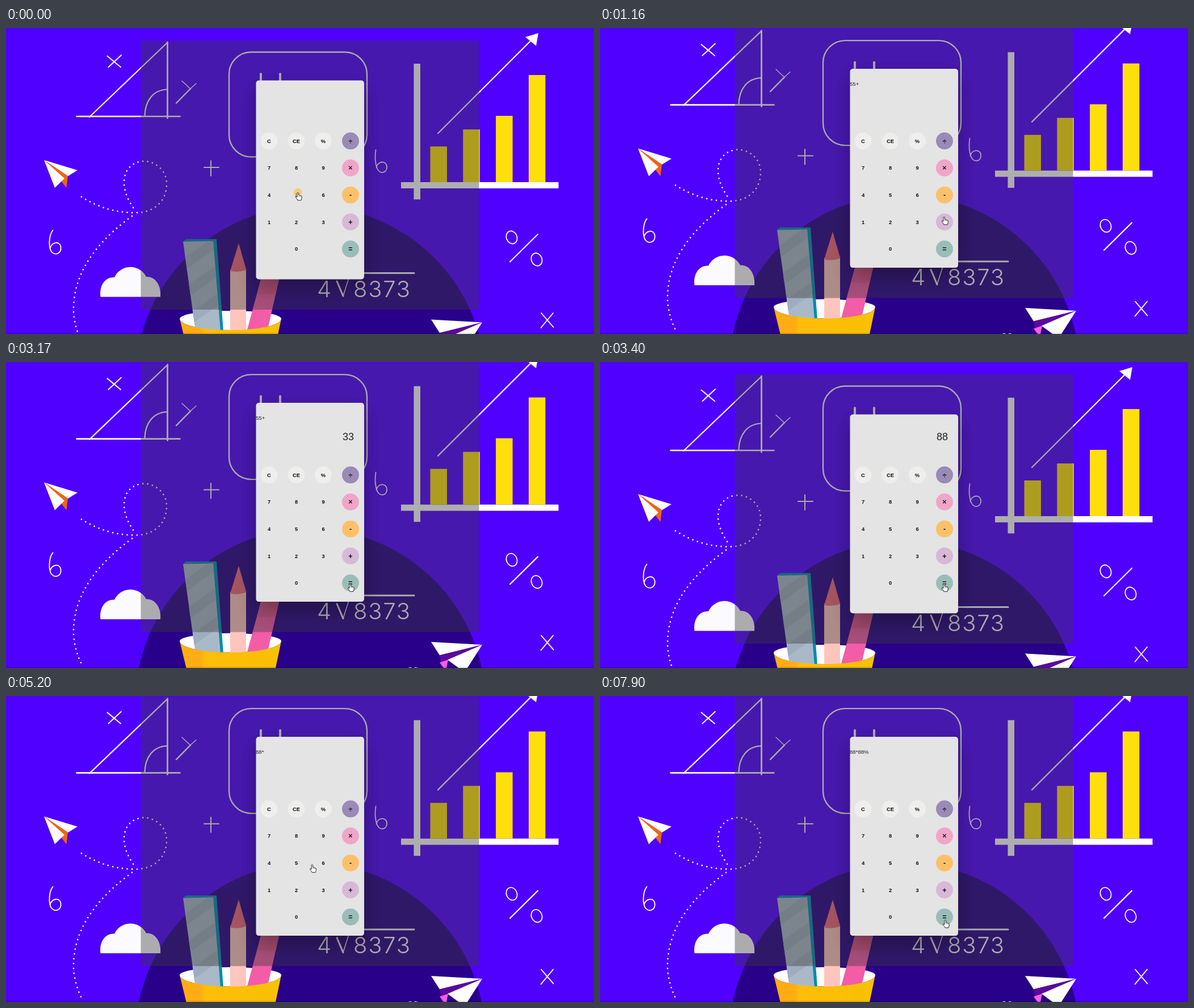
Recreate the animation shown at these times as an HTML page with a canvas. Size 1036x540 px, loop 8 s.

```html
<!DOCTYPE html>
<html lang="en">
<head>
<meta charset="utf-8">
<title>Calculator</title>
<style>
html, body { margin: 0; width: 100%; height: 100%; overflow: hidden; background: #5000ff; }
canvas { display: block; width: 1036px; height: 540px; }
</style>
</head>
<body>
<canvas id="stage" width="1036" height="540"></canvas>
<script>
const ctx = document.getElementById('stage').getContext('2d');
const LOOP = 8000, LIFT = -20.4;
const SANS = '"Liberation Sans", Arial, sans-serif';
const WHITE = '#fbfbff';

function fill(d, color) {
  ctx.fillStyle = color;
  ctx.fill(new Path2D(d));
}

function line(d, width = 2, color = WHITE) {
  ctx.strokeStyle = color;
  ctx.lineWidth = width;
  ctx.stroke(new Path2D(d));
}

function box(x, y, w, h, color) {
  ctx.fillStyle = color;
  ctx.fillRect(x, y, w, h);
}

function disc(x, y, r, color) {
  ctx.fillStyle = color;
  ctx.beginPath();
  ctx.arc(x, y, r, 0, 7);
  ctx.fill();
}

function text(s, x, y, font, align = 'center', color = '#111') {
  ctx.font = font;
  ctx.textAlign = align;
  ctx.fillStyle = color;
  ctx.fillText(s, x, y);
}

function sketches() {
  line('M124.500 156H306.500', 2.6);
  line('M284.5 25V159', 2.8);
  line('M147 157L284.500 25.500', 2.2);
  line('M244.5 155C245 129 259 109 284 108.5', 2.2);
  line('M300 132.5L325 107', 2.4);
  line('M325 107L335 98M310 93.5L325 107.5', 1.4);
  line('M178.500 49.500L202 69M203 48L180.500 69', 2.1);
  line('M943 503L964.500 528M964 503L942.500 529', 1.9);
  line('M349 246H375M361 234.5V261', 2);
  ctx.beginPath();
  ctx.roundRect(393, 42.5, 243, 185, 39);
  ctx.lineWidth = 2.4;
  ctx.stroke();
  line('M449 81V100M483 81V100', 4);
  line('M651.500 215C650 225 650 238 654 248C659 259 672 256 671 244C669 233 655 235 652.500 246', 1.8);
  line('M82.500 357C75.500 366 75 384 79 393C85 403 98 399 96.500 386C94 375 81 378 78 388', 1.9);
  line('M888 412.500L937 364', 2.2);
  for (const [x, y] of [[891, 369.5], [935, 408.5]]) {
    ctx.beginPath();
    ctx.ellipse(x, y, 9.3, 11.5, -0.4, 0, 7);
    ctx.lineWidth = 1.8;
    ctx.stroke();
  }
  ctx.letterSpacing = '1.8px';
  text('4', 548, 474.5, '350 40px Inter, sans-serif', 'left', WHITE);
  text('8373', 612, 474.5, '350 40px Inter, sans-serif', 'left', WHITE);
  ctx.letterSpacing = '0px';
  line('M583 447L594 473', 3);
  line('M594 473L607 432', 1.5);
  line('M607 432.500H719', 3);
}

function chart() {
  box(718.5, 63, 11.5, 239.5, WHITE);
  box(696, 272, 277.5, 11, '#fff');
  const tops = [209, 179, 155, 83];
  tops.forEach((y, i) => box(747.5 + i * 57.8, y, 29.5, 272 - y, '#ffdf0b'));
  line('M761 186L925 22', 2.3);
  fill('M938 9L915 16L934 31.5Z', WHITE);
}

function flyers() {
  fill('M67 233L126 251L109 261.500Z', '#fff');
  fill('M67 233L109 261L106.500 282L98 271Z', '#ee6417');
  fill('M67 233L103 265.500L86 282Z', '#fff');
  ctx.setLineDash([0, 8.6]);
  line('M133 298C165 318 195 326 228 326C262 326 283 305 283 275C283 250 262 235 243 235C222 236 208 250 208 273C208 290 218 310 228 322', 2.8);
  line('M222 332C150 385 118 440 119 500C120 520 126 540 134 555', 2.8);
  ctx.setLineDash([]);
  fill('M749 514.500L839 519.500L764 538Z', '#fff');
  fill('M839 519.500L764 538L768 562L778 547Z', '#5c089e');
  fill('M764 551L779 546L775 565Z', '#f95fe0');
  fill('M839 519.500L778 546L808 568Z', '#fff');
  line('M706 562L713 560M721 560L729 562', 2);
  fill('M166.500 474.500C164 455 174 439 191 440A31 31 0 0 1 247 439C264 438 274 456 272 474.500Z', WHITE);
}

function cup() {
  fill('M306 513A89.500 14 0 0 1 485 513A89.500 20 0 0 1 306 513Z', '#fff');
  fill('M312 377L317 372.500H371L383 536H376Z', '#008bb0');
  const front = 'M312 377L365 376L378 536H334Z';
  fill(front, '#a9b9c8');
  ctx.save();
  ctx.clip(new Path2D(front));
  for (let y = 405; y < 560; y += 52) line(`M300 ${y + 22}L390 ${y - 42}`, 18, '#9dadbd');
  ctx.restore();
  fill('M395 426H423V536H395Z', '#ffc5bd');
  fill('M410 380L423.500 427Q409 432 395 429Z', '#ef677a');
  fill('M450 440H482L460 536H424Z', '#f35ca6');
  fill('M450 440H482L474 470H442Z', '#e85590');
  const shade = ctx.createLinearGradient(306, 0, 485, 0);
  shade.addColorStop(0, '#ffad12');
  shade.addColorStop(0.21, '#ffad12');
  shade.addColorStop(0.25, '#ffbd0a');
  shade.addColorStop(1, '#f7c100');
  fill('M306 513A89.500 20 0 0 0 485 513L473 570H320Z', shade);
}

function scene() {
  ctx.lineCap = 'round';
  disc(536, 623, 308.5, '#28008a');
  sketches();
  chart();
  flyers();
  cup();
  box(237.5, 22, 596, 475, 'rgba(58,58,58,.41)');
  ctx.save();
  ctx.shadowColor = 'rgba(0,0,0,.3)';
  ctx.shadowBlur = 36;
  ctx.shadowOffsetY = 14;
  ctx.fillStyle = '#e4e4e4';
  ctx.beginPath();
  ctx.roundRect(440.5, 92.5, 190.5, 351, 5);
  ctx.fill();
  ctx.restore();
}

const COLS = [463.5, 511.5, 559, 607];
const ROWS = [199.3, 247, 294.7, 342.2, 390];
const KEYS = [['C', 'CE', '%', '÷'], ['7', '8', '9', '×'], ['4', '5', '6', '-'], ['1', '2', '3', '+'], ['', '0', '', '=']];
const OPS = ['#9a8ab8', '#f0a5c8', '#fdc06a', '#d8b8d6', '#9abdb9'];

function keypad(t) {
  KEYS.forEach((row, r) => row.forEach((key, c) => {
    const x = COLS[c], y = ROWS[r];
    if (c === 3) {
      disc(x, y, 15, OPS[r]);
      const size = key === '×' && t >= 4640 && t < 4710 ? 7 : 12.5;
      text(key, x, y + size * 0.35, `bold ${size}px ${SANS}`);
    } else {
      if (r === 0) disc(x, y, 15, '#eeeeec');
      text(key, x, y + 3.3, `bold 9.4px ${SANS}`);
    }
  }));
}

// Each entry: start time, text shown from then on
const NUMBER = [[0, ''], [70, '5'], [230, '55'], [1160, ''], [2320, '3'], [2540, '33'], [3400, '88'],
  [4710, ''], [6130, '8'], [6280, '88'], [6970, '']];
const FORMULA = [[0, ''], [1160, '55+'], [3400, ''], [4710, '88*'], [6970, '88*88%']];
const at = (list, t) => list.filter(e => e[0] <= t).pop()[1];

// Each move: start, end, steps, then the points passed
const MOVES = [
  [460, 610, 3, [575, 352], [590, 357]],
  [780, 1080, 5, [602, 333]],
  [1310, 1780, 7, [575, 348], [551.5, 344]],
  [2540, 2940, 6, [575, 380], [602, 404]],
  [3090, 3170, 2, [602, 391]],
  [3630, 4240, 9, [545, 310], [602, 259]],
  [4410, 4640, 4, [602, 253]],
  [4880, 4950, 2, [541, 300]],
  [5200, 5960, 11, [509, 285], [510, 250]],
  [6430, 6740, 5, [558, 209]],
  [7290, 7900, 9, [604, 395]]
];

function pointer(t) {
  let pos = [510, 290];
  for (const [t0, t1, steps, ...stops] of MOVES) {
    if (t < t0) break;
    const gap = (t1 - t0) / (steps - 1);
    const done = Math.min(steps, Math.floor((t - t0) / gap + 1e-6) + 1) / steps;
    const path = [pos, ...stops];
    const u = done * stops.length;
    const i = Math.min(stops.length - 1, Math.floor(u));
    pos = path[i].map((v, k) => v + (path[i + 1][k] - v) * (u - i));
  }
  return pos;
}

const CLICKS = [[0, 150, '#f4cb62'], [2240, 2540, '#f3ef4c'], [5960, 6210, '#f3ef4c'], [6890, 6970, '#f3ef4c']];

function hand(t) {
  const [x, y] = pointer(t);
  const click = CLICKS.find(c => t >= c[0] && t < c[1]);
  ctx.save();
  ctx.translate(x, y);
  if (click) {
    ctx.globalAlpha = 0.78;
    disc(4.2, 0.3, 7.5, click[2]);
    ctx.globalAlpha = 1;
  }
  const d = 'M3 1Q4.500 -.5 5.500 1V5Q7 4.500 7.500 5.500Q9 5 9.400 6.200Q11 6 11.200 7.500V10Q11 12 10 14H4Q2.500 11 .5 8.800Q0 7 2 7.500L3 8.500Z';
  fill(d, '#fff');
  line(d, 1, '#222');
  line('M5.800 5.500V8M7.800 6V8M9.600 6.500V8', 0.6, '#555');
  ctx.restore();
}

function draw(t) {
  const formula = at(FORMULA, t);
  box(0, 0, 1036, 540, '#5000ff');
  ctx.save();
  ctx.translate(0, formula ? LIFT : 0);
  scene();
  ctx.restore();
  box(0, 538, 1036, 2, 'rgba(20,0,50,.14)');
  text(formula, 440, 101.6, `9.6px ${SANS}`, 'left', '#222');
  text(at(NUMBER, t), 613, 138, `18px ${SANS}`, 'right', '#222');
  keypad(t);
  hand(t);
}

let start;
function tick(now) {
  if (start === undefined) start = now;
  draw((now - start) % LOOP);
  requestAnimationFrame(tick);
}
draw(0);
requestAnimationFrame(tick);
</script>
</body>
</html>
```
